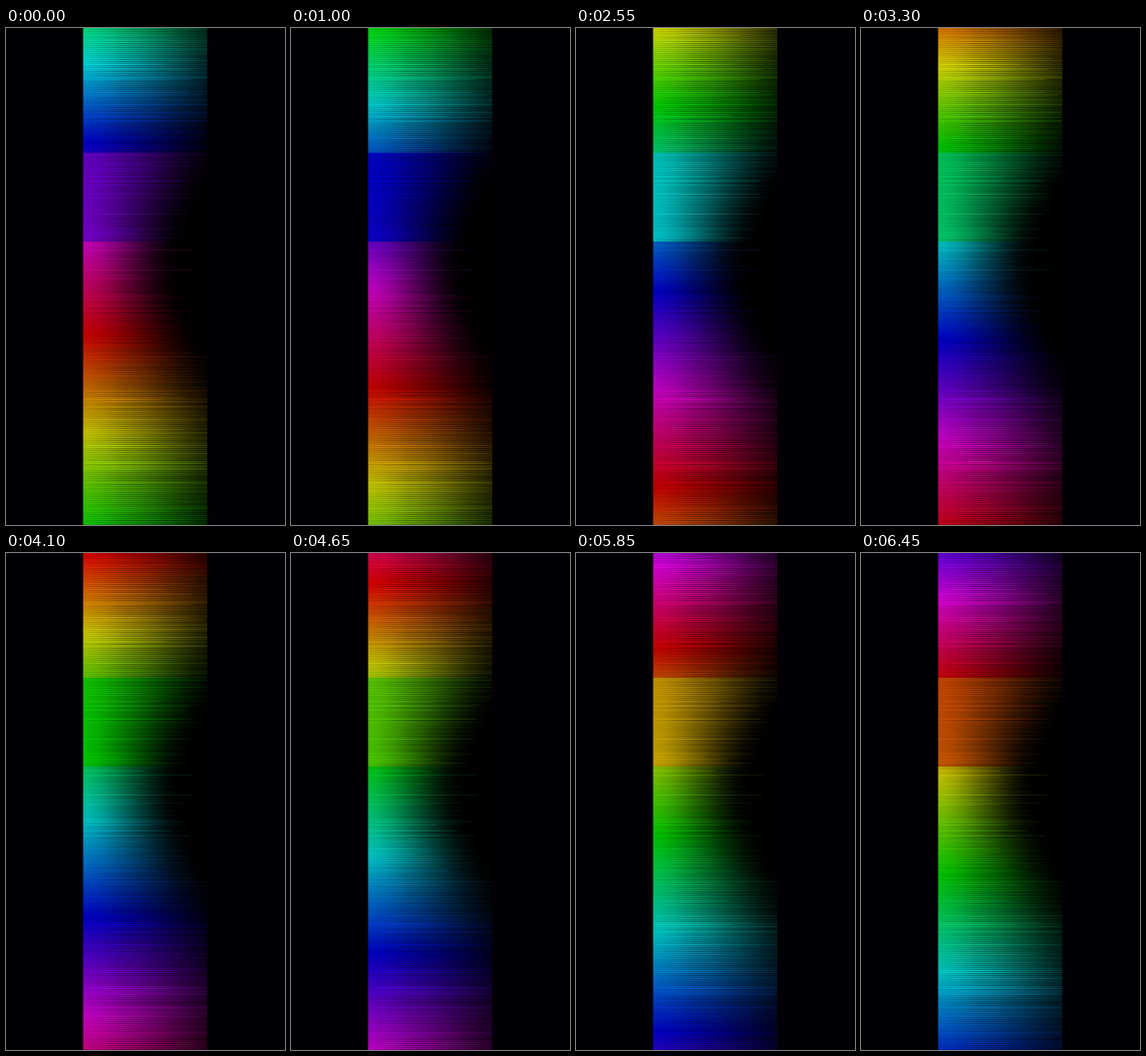
These frames come from a looping animation (280x498 px, 6500 ms). An HTML page with a canvas:

```html
<!DOCTYPE html>
<html lang="en">
<head>
<meta charset="utf-8">
<title>Rainbow streaks</title>
<style>
  html, body { margin: 0; height: 100%; overflow: hidden; background: #020004; }
  canvas { display: block; width: 100vw; height: 100vh; }
</style>
</head>
<body>
<canvas id="stage" width="280" height="498"></canvas>
<script>
const H = 498, LEFT = 77, W = 125, LOOP = 6500, STEP = 50;
const BAND_1 = 125, BAND_2 = 214, WAIST = 240;
const ctx = document.getElementById('stage').getContext('2d');

let seed = 41;
function rand() {
  seed = (seed + 0x6D2B79F5) | 0;
  let t = Math.imul(seed ^ (seed >>> 15), 1 | seed);
  t = (t + Math.imul(t ^ (t >>> 7), 61 | t)) ^ t;
  return ((t ^ (t >>> 14)) >>> 0) / 4294967296;
}
const between = (a, b) => a + (b - a) * rand();
const clamp = v => Math.max(0, Math.min(1, v));
const smooth = v => { v = clamp(v); return v * v * (3 - 2 * v); };

// The light is pinched at the waist and spreads towards both ends
const reachAt = y => 95 + 80 * smooth(Math.abs(y - WAIST) / 200);

// The streaks stay still: a black layer whose opacity hides the colours below
function makeMask() {
  const layer = document.createElement('canvas');
  layer.width = W;
  layer.height = H;
  const g = layer.getContext('2d'), img = g.createImageData(W, H);
  for (let y = 0; y < H; y++) {
    const reach = reachAt(y) * between(0.96, 1.08);
    const lit = rand() < 0.25;
    const end = lit ? reach * between(0.45, 1.1) : 0;
    const gain = between(0.08, 0.2);
    const dim = (y % 2 ? 0.18 : 0) + between(0, 0.12);
    for (let x = 0; x < W; x++) {
      const inner = clamp(x / 40);
      let b = 0.92 * (1 - smooth(x / reach));
      b *= 1 - dim * (0.2 + 0.8 * inner);
      if (x < end) b += gain * (0.3 + 0.7 * inner) * (1 - 0.5 * x / end);
      if (x === 0) b *= 0.6; // soft left edge
      img.data[(y * W + x) * 4 + 3] = 255 * (1 - clamp(b));
    }
  }
  g.putImageData(img, 0, 0);
  return layer;
}
const mask = makeMask();

// Three bands, with hue jumps between them
function hueAt(y) {
  if (y < BAND_1) return 155 + 0.74 * y;
  if (y < BAND_2) return 270 + 0.06 * (y - BAND_1);
  return 303 + 0.61 * (y - BAND_2);
}

// The hue drift starts gently, then runs at 40 degrees per second
const drift = t => 40 * t - 9 * (1 - Math.exp(-3 * t));

function draw() {
  const t = Math.floor(performance.now() % LOOP / STEP) * STEP / 1000;
  const shift = drift(t);
  ctx.fillStyle = '#020004';
  ctx.fillRect(0, 0, 280, H);
  for (let y = 0; y < H; y++) {
    const hue = (hueAt(y) - shift + 360) % 360;
    const light = 41 + 4 * smooth(1 - y / BAND_1);
    ctx.fillStyle = `hsl(${hue}, 100%, ${light}%)`;
    ctx.fillRect(LEFT, y, W, 1);
  }
  ctx.drawImage(mask, LEFT, 0);
  requestAnimationFrame(draw);
}
draw();
</script>
</body>
</html>
```
